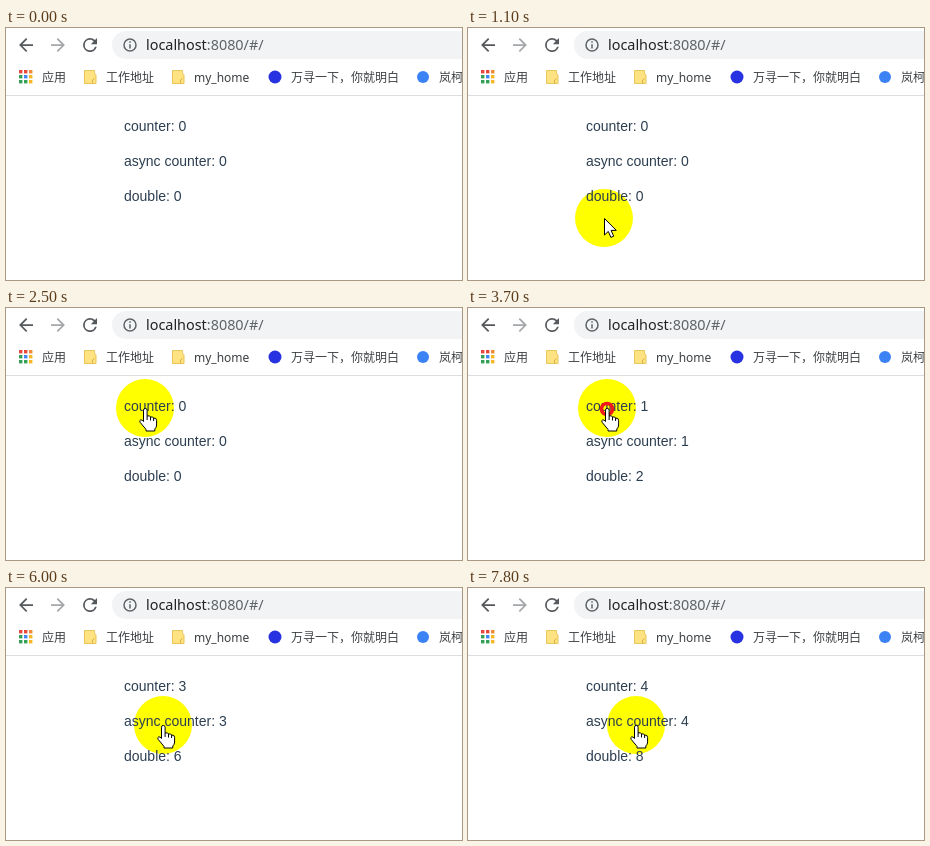
Write an HTML page that moves like this. It is 456 px wide and 252 px high and loops after 8 s.

```html
<!DOCTYPE html>
<html lang="zh">
<head>
<meta charset="utf-8">
<title>Counter demo</title>
<style>
  html, body { margin: 0; width: 100%; height: 100%; overflow: hidden; background: #fff; }
  svg { display: block; width: 100%; height: 100%; }
  .url { font: 14.4px "Noto Sans", sans-serif; fill: #202124; }
  .bookmark { font: 12px "Noto Sans", "Noto Sans CJK SC", "Noto Sans CJK", sans-serif; fill: #3c4043; }
  .page { font: 14px "Liberation Sans", Arial, sans-serif; fill: #2c3e50; }
  .cursor { fill: #fff; stroke: #000; stroke-linejoin: round; }
</style>
</head>
<body>
<svg viewBox="0 0 456 252">
  <defs>
    <path id="back" d="M20 11H7.83l5.59-5.59L12 4l-8 8 8 8 1.41-1.41L7.83 13H20z"/>
    <g id="folder">
      <path d="M.5.5h10v3l1.5 1.2v8.8H.5z" fill="#ffe281" stroke="#e9c65a"/>
      <path d="M8.5 13.5V10l2-1.5" fill="none" stroke="#d9b23f"/>
    </g>
  </defs>

  <!-- Toolbar -->
  <use href="#back" fill="#55585c" transform="translate(9.6 6.6) scale(.87)"/>
  <use href="#back" fill="#a3a6aa" transform="translate(62.4 6.6) scale(-.87 .87)"/>
  <path fill="#55585c" transform="translate(73.6 6.6) scale(.87)" d="M17.65 6.35A7.96 7.96 0 0 0 12 4a8 8 0 1 0 7.73 10h-2.08A6 6 0 1 1 12 6c1.66 0 3.14.69 4.22 1.78L13 11h7V4z"/>
  <rect x="106" y="3" width="380" height="28" rx="14" fill="#f1f3f4"/>
  <g fill="none" stroke="#5f6368" stroke-width="1.5">
    <circle cx="124" cy="17" r="6"/>
    <path d="M124 13.3v1.5M124 16.2v4.3"/>
  </g>
  <text class="url" x="140" y="22">localhost<tspan fill="#5f6368">:8080/#/</tspan></text>

  <!-- Bookmarks -->
  <g id="apps"></g>
  <use href="#folder" x="78" y="42"/>
  <use href="#folder" x="166" y="42"/>
  <circle cx="269" cy="49" r="6.5" fill="#2932e1"/>
  <circle cx="417" cy="49" r="6" fill="#3b82f6"/>
  <g class="bookmark">
    <text x="36" y="54">应用</text>
    <text x="100" y="54">工作地址</text>
    <text x="188" y="54">my_home</text>
    <text x="285" y="54">万寻一下，你就明白</text>
    <text x="433" y="54">岚柯</text>
  </g>
  <path d="M0 67.5h456" stroke="#dcdee1"/>

  <!-- Page -->
  <circle id="halo" r="29" fill="#ff0"/>
  <g class="page">
    <text x="118" y="103" id="counter"></text>
    <text x="118" y="138" id="async"></text>
    <text x="118" y="173" id="double"></text>
  </g>
  <g id="pointer">
    <circle id="ring" cy="1" r="5.5" fill="none" stroke="#f01818" stroke-width="3.6"/>
    <path id="arrow" class="cursor" d="M.5.5V17l3.8-3.6 2.6 6 2.8-1.2-2.6-5.8h5.2z"/>
    <g id="hand" class="cursor">
      <path d="M-1.5 13.5V2.2a1.8 1.8 0 0 1 3.6 0V8q2.9-.9 3.4 1 2.6-.7 3.1 1.1 3-.4 3 2.2V17q0 2.4-1.8 4v2H1v-1.6L-4.8 14.4q-1.2-2 .6-2.6 1.2-.2 2.7 1.7z"/>
      <path d="M2.1 8v4M5.5 9v3.5M8.6 10v3" fill="none"/>
    </g>
  </g>
</svg>
<script>
const LOOP = 8000, STEP = 100;
const $ = id => document.getElementById(id);

// Pointer path: time, x, y
const track = [
  [0, 500, 165], [100, 440, 165], [200, 388, 162], [400, 380, 200], [500, 385, 235], [600, 385, 300],
  [900, 179, 300], [1000, 178, 236], [1100, 136, 190], [1400, 134, 145], [1800, 137, 109],
  [2500, 139, 100], [5400, 139, 100], [5500, 143, 120], [6000, 157, 137], [6300, 168, 137], [LOOP, 168, 137]
];
const presses = [2600, 3700, 4600, 6500];
const updates = [2700, 3800, 4700, 7600];

const red = "#e8473c", green = "#34a056", yellow = "#f5b825", blue = "#4285f4";
$("apps").innerHTML = [red, red, "#f08a35", green, blue, yellow, green, green, yellow].map((color, i) =>
  `<rect x="${13 + i % 3 * 5}" y="${42 + Math.floor(i / 3) * 5}" width="3.4" height="3.4" fill="${color}"/>`).join("");

function pointerAt(t) {
  const i = track.findIndex(key => key[0] > t);
  const [t0, x0, y0] = track[i - 1], [t1, x1, y1] = track[i];
  const k = (t - t0) / (t1 - t0);
  return [x0 + (x1 - x0) * k, y0 + (y1 - y0) * k];
}

function show(id, visible) {
  $(id).setAttribute("visibility", visible ? "visible" : "hidden");
}

function draw(now) {
  const t = Math.floor(now % LOOP / STEP) * STEP;
  const [x, y] = pointerAt(t);
  const move = `translate(${x} ${y})`;
  $("halo").setAttribute("transform", move);
  $("pointer").setAttribute("transform", move);

  const overLink = x > 117 && x < 222 && (y > 88 && y < 111 || y > 123 && y < 146);
  show("hand", overLink);
  show("arrow", !overLink);
  show("ring", presses.some(p => t >= p && t < p + 200));

  const count = updates.filter(u => t >= u).length;
  $("counter").textContent = `counter: ${count}`;
  $("async").textContent = `async counter: ${count}`;
  $("double").textContent = `double: ${count * 2}`;
}

const start = performance.now();
function frame() {
  draw(performance.now() - start);
  requestAnimationFrame(frame);
}
frame();
</script>
</body>
</html>
```
